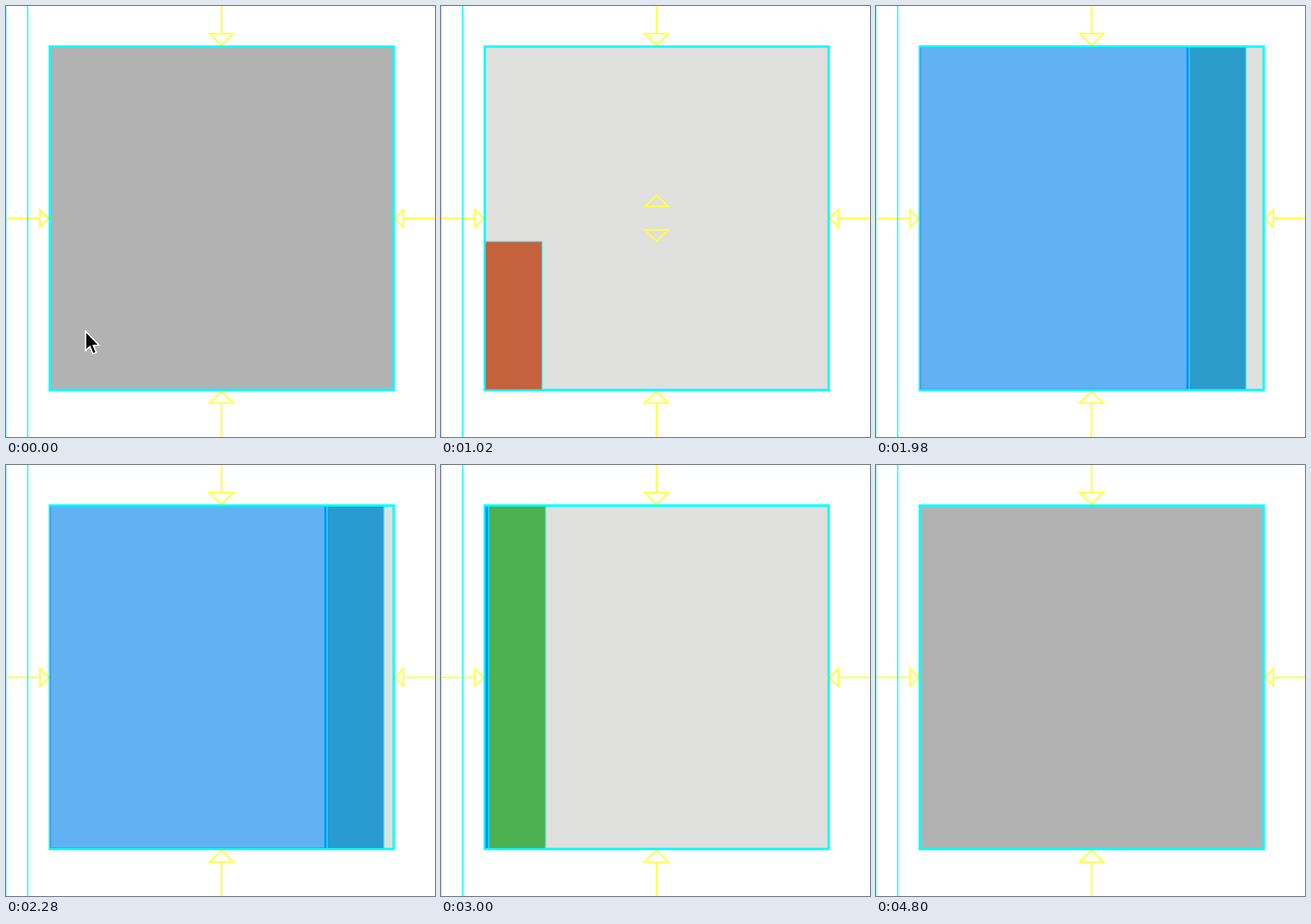
These frames come from a looping animation (644 px wide and 648 px high, 4860 ms). An HTML page with a canvas:

```html
<!DOCTYPE html>
<html lang="en">
<head>
<meta charset="utf-8">
<title>Staggered layout</title>
<style>
  html, body { margin: 0; height: 100%; overflow: hidden; background: #fff; }
  canvas { display: block; }
</style>
</head>
<body>
<canvas id="stage" width="644" height="648"></canvas>
<script>
const ctx = document.getElementById('stage').getContext('2d');
const LOOP = 4860, STEP = 60;
const X = 66, Y = 61, SIZE = 516, STRIP = 86, HEAD = 17.6;
const MID_X = 323.5, MID_Y = 319.3;
const GROW = 985, SLIDE = 857, START = 305, BACK = 2177;
const CYAN = '#0ff', YELLOW = '#ffff4a', EDGE = '#0090ff';
const RED = [244, 67, 54], GREEN = [76, 175, 80], BLUE = [33, 150, 243];

const clamp = v => Math.min(1, Math.max(0, v));
const mix = (a, b, k) => `rgb(${a.map((v, i) => Math.round(v + (b[i] - v) * k))})`;

function bounceOut(x) {
  const n = 7.5625, d = 2.75;
  if (x < 1 / d) return n * x * x;
  if (x < 2 / d) return n * (x - 1.5 / d) ** 2 + 0.75;
  if (x < 2.5 / d) return n * (x - 2.25 / d) ** 2 + 0.9375;
  return n * (x - 2.625 / d) ** 2 + 0.984375;
}
const bounceIn = x => 1 - bounceOut(1 - x);

function fill(color, x, y, w, h) {
  ctx.fillStyle = color;
  ctx.fillRect(x, y, w, h);
}

function outline(color, x, y, w, h, width) {
  ctx.strokeStyle = color;
  ctx.lineWidth = width;
  ctx.strokeRect(x, y, w, h);
}

// Arrow of a given length whose tip is at x, y, pointing down before rotation.
function arrow(x, y, angle, length, head, half, shaft = true) {
  ctx.save();
  ctx.translate(x, y);
  ctx.rotate(angle);
  ctx.strokeStyle = YELLOW;
  ctx.lineWidth = 2.6;
  ctx.beginPath();
  if (shaft) {
    ctx.moveTo(0, -length);
    ctx.lineTo(0, -head);
  }
  ctx.moveTo(0, -head);
  ctx.lineTo(half, -head);
  ctx.lineTo(0, -1);
  ctx.lineTo(-half, -head);
  ctx.closePath();
  ctx.stroke();
  ctx.restore();
}

function drawCursor(t) {
  const k = clamp((t - 360) / 420);
  if (k === 1) return;
  const e = k * k * (3 - 2 * k);
  ctx.save();
  ctx.translate(119.5 - 70 * e, 489 + 172 * e);
  ctx.beginPath();
  [[0, 0], [0, 29], [6.5, 23], [11, 34], [16, 32], [11.5, 21.5], [20, 21]]
    .forEach(p => ctx.lineTo(...p));
  ctx.closePath();
  ctx.fillStyle = '#000';
  ctx.fill();
  ctx.strokeStyle = '#fff';
  ctx.lineWidth = 2;
  ctx.stroke();
  ctx.restore();
}

function drawSpacing(height, shaft) {
  const gap = SIZE - height;
  if (gap < 0.5) return;
  const head = Math.min(gap * 0.2, HEAD);
  arrow(MID_X, Y + gap, 0, gap, head, head, shaft);
  arrow(MID_X, Y + SIZE - gap, Math.PI, gap, head, head, shaft);
}

function drawPadding(pad) {
  if (pad <= 0) return;
  fill('#62b2f3', X, Y, pad, SIZE);
  outline('#3a94e0', X + 1, Y + 1, Math.max(0, pad - 1), SIZE - 2, 1.5);
  const band = Math.min(pad, 3.6);
  fill(EDGE, X + pad - band, Y, band, SIZE);
}

function draw(t) {
  const forward = t < BACK;
  const grow = clamp(forward ? (t - START) / GROW : (BACK + SLIDE + GROW - t) / GROW);
  const slide = clamp(forward ? (t - START - GROW) / SLIDE : (BACK + SLIDE - t) / SLIDE);
  const rise = bounceIn(grow), shift = bounceOut(slide);
  const height = SIZE * rise, pad = (SIZE - STRIP) * shift;
  const visible = grow > 0;

  fill('#fff', 0, 0, 644, 648);
  arrow(MID_X, 60, 0, 60, 18.5, 18);
  arrow(MID_X, 578.5, Math.PI, 70, 18.5, 18);
  arrow(65, MID_Y, -Math.PI / 2, 65, 14, 13);
  arrow(582.5, MID_Y, Math.PI / 2, 62, 14, 13);
  fill('#80f4f4', 0, 0, 1, 648);
  fill('#1ff', 31.5, 0, 2, 648);

  fill(visible ? '#e0e0df' : '#b2b2b2', X, Y, SIZE, SIZE);
  outline(CYAN, 65.7, 61, 516.3, 516.3, 3.6);
  if (visible) {
    drawPadding(pad);
    const top = Y + SIZE - height;
    const color = slide > 0
      ? mix(GREEN, BLUE, clamp((shift - 0.19) / 0.99))
      : mix(RED, GREEN, 0.285 + 0.715 * clamp((rise - 0.43) / 0.57));
    fill(color, X + pad, top, STRIP, height);
    outline('#1fe9e9', X + pad + 0.4, top, STRIP - 0.8, height, 1.6);
    drawSpacing(height, !forward || grow < 0.636);
    if (height > SIZE - 1) {
      fill(CYAN, X, 59.5, SIZE, 3);
      fill(CYAN, X, 576, SIZE, 3);
    }
  }
  drawCursor(t);
}

const begin = performance.now();
function frame() {
  const t = (performance.now() - begin) % LOOP;
  draw(Math.floor(t / STEP) * STEP);
  requestAnimationFrame(frame);
}
frame();
</script>
</body>
</html>
```
